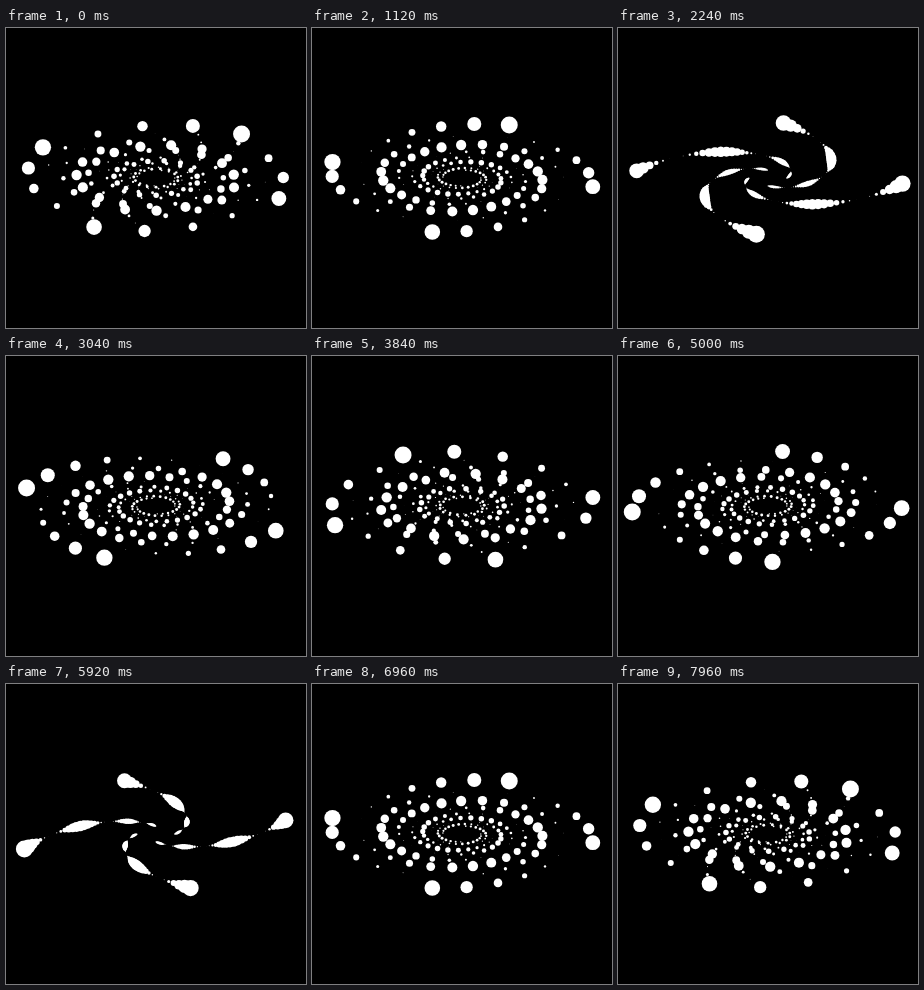
Recreate the animation shown at these times as an HTML page with a canvas. Size 300 px wide and 300 px high, loop 8000 ms.

```html
<!DOCTYPE html>
<html lang="en">
<head>
<meta charset="utf-8">
<title>Spiral dots</title>
<style>
  html, body { margin: 0; width: 100%; height: 100%; overflow: hidden; background: #000; }
  canvas { display: block; width: 300px; height: 300px; }
</style>
</head>
<body>
<canvas id="stage" width="300" height="300"></canvas>
<script>
  const LOOP = 8000, TICK = 40;
  const COUNT = 200;
  const CENTER = 150, INNER = 18.84, GROWTH = 1.01, TILT = 0.414;
  const TAU = Math.PI * 2;

  const ctx = document.getElementById('stage').getContext('2d');

  // The step between neighbours swings around a quarter turn, winding the arms both ways.
  function draw(time) {
    const step = TAU / 4 + TAU / 64 * Math.cos(TAU * (time - TICK) / LOOP);
    ctx.fillStyle = '#000';
    ctx.fillRect(0, 0, 300, 300);
    ctx.fillStyle = '#fff';
    for (let i = 0; i < COUNT; i++) {
      const reach = INNER * GROWTH ** i;
      const size = reach / 30 * (1 + Math.sin(i / 10));
      const x = CENTER + reach * Math.cos(i * step);
      const y = CENTER + reach * TILT * Math.sin(i * step);
      ctx.beginPath();
      ctx.arc(x, y, size, 0, TAU);
      ctx.fill();
    }
  }

  const start = performance.now();
  let shown = -1;

  function play() {
    // A small allowance keeps clock jitter from delaying a tick.
    const elapsed = performance.now() - start + 3;
    const tick = Math.floor(elapsed / TICK) % (LOOP / TICK);
    if (tick !== shown) {
      shown = tick;
      draw(tick * TICK);
    }
    requestAnimationFrame(play);
  }
  play();
</script>
</body>
</html>
```
